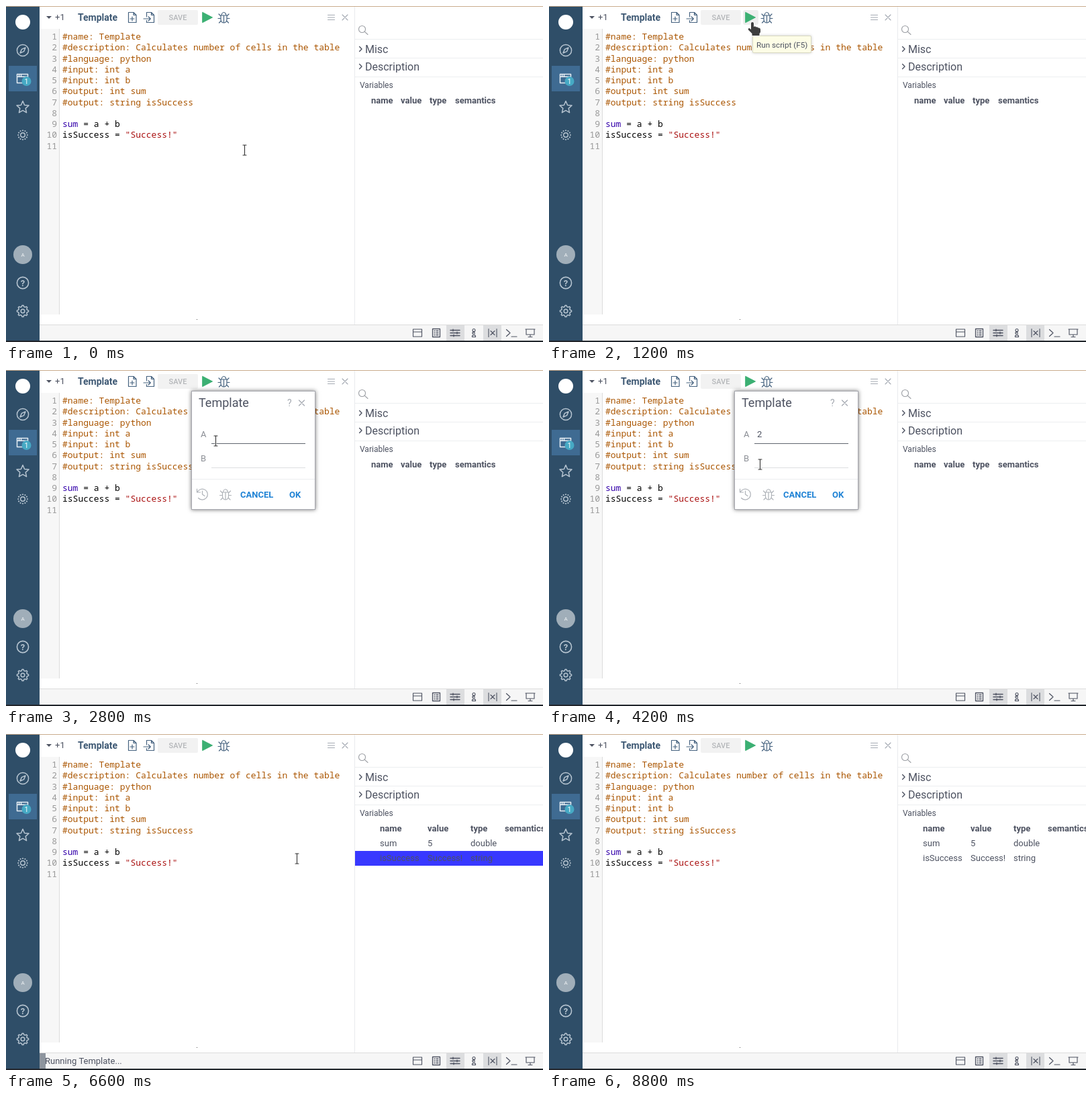
An HTML page with a canvas that plays this animation: 800 by 500 pixels, repeating every 9800 ms.

```html
<!DOCTYPE html>
<html lang="en">
<head>
<meta charset="utf-8">
<title>Script editor</title>
<style>
html, body { margin: 0; width: 100%; height: 100%; overflow: hidden; background: #fff; }
canvas { display: block; width: 800px; height: 500px; }
</style>
</head>
<body>
<canvas id="stage" width="800" height="500"></canvas>
<script>
const g = document.getElementById('stage').getContext('2d');
const LOOP = 9800, TICK = 200;
const UI = 'Roboto, sans-serif', MONO = '"Noto Sans Mono", monospace';
const INK = '#4d5261', STEEL = '#45627f', PALE = '#b6c4d0', BLUE = '#2083d5';

function rect(x, y, w, h, fill) {
  g.fillStyle = fill;
  g.fillRect(x, y, w, h);
}

function round(x, y, w, h, r, fill) {
  g.beginPath();
  g.roundRect(x, y, w, h, r);
  g.fillStyle = fill;
  g.fill();
}

function disc(x, y, r, fill) {
  g.beginPath();
  g.arc(x, y, r, 0, 7);
  g.fillStyle = fill;
  g.fill();
}

function text(s, x, y, size, fill = INK, weight = 400, family = UI, align = 'left') {
  g.font = `${weight} ${size}px ${family}`;
  g.textAlign = align;
  g.fillStyle = fill;
  g.fillText(s, x, y);
}

// Icon from path data, placed around (x, y)
function icon(d, x, y, color, width = 1.2, fill) {
  const p = new Path2D(d);
  g.save();
  g.translate(x, y);
  g.lineJoin = g.lineCap = 'round';
  if (fill) { g.fillStyle = fill; g.fill(p); }
  if (color) { g.strokeStyle = color; g.lineWidth = width; g.stroke(p); }
  g.restore();
}

const ring = (r, x = 0, y = 0) => `M${x + r} ${y}a${r} ${r} 0 1 1 ${-2 * r} 0a${r} ${r} 0 1 1 ${2 * r} 0z`;
const box = (x, y, w, h) => `M${x} ${y}h${w}v${h}h${-w}z`;

// Closed outline whose radius depends on the point index
function polar(n, radius, turn = -Math.PI / 2) {
  let d = '';
  for (let i = 0; i < n; i++) {
    const a = turn + i * 2 * Math.PI / n, r = radius(i);
    d += `${i ? 'L' : 'M'}${(r * Math.cos(a)).toFixed(2)} ${(r * Math.sin(a)).toFixed(2)}`;
  }
  return d + 'z';
}

const ICON = {
  star: polar(10, i => i % 2 ? 4.4 : 9.5),
  gear: polar(32, i => i % 4 < 2 ? 8.6 : 6.6, -1.67) + ring(2.8),
  compass: ring(8.6) + 'M4 -4L1.6 1.6L-4 4L-1.6 -1.6z',
  close: 'M-4 -4L4 4M4 -4L-4 4',
  menu: 'M-5 -3.5h10M-5 0h10M-5 3.5h10',
  chevron: 'M-1.7 -3.5L1.7 0L-1.7 3.5',
  search: ring(5, -1.5, -1.5) + 'M2.2 2.2L7 6.5',
  bug: 'M-4.5 -3h9v6a4.5 5 0 0 1 -9 0zM-3.3 -3a3.3 4.5 0 0 1 6.6 0M0 -3v11' +
       'M-4.5 -2L-7.5 -5M4.5 -2L7.5 -5M-4.5 1.5h-4M4.5 1.5h4M-4 5L-7 8M4 5L7 8',
  fileAdd: 'M-5.5 -7.5h7.5l4 4v11h-11.5zM2 -7.5v4h4M0 -1v6M-3 2h6',
  fileIn: 'M-3.5 -1v-6.5h7l4 4v11h-11v-3M3.5 -7.5v4h4M-8 2h10M-1 -1.2L2.3 2L-1 5.2',
  history: 'M-7 -4A8 8 0 1 1 -6 5.5M-8 -8v5h5M0 -5v5l3.5 2.5'
};

const CODE = [
  '#name: Template',
  '#description: Calculates number of cells in the table',
  '#language: python',
  '#input: int a',
  '#input: int b',
  '#output: int sum',
  '#output: string isSuccess',
  '',
  [['sum', '#30a'], [' = a + b', '#000']],
  [['isSuccess = ', '#000'], ['"Success!"', '#a11']],
  ''
];

// start time, shape, hot spot
const CURSOR = [
  [0, 'beam', 355, 214], [200, 'beam', 352, 205], [400, 'beam', 341, 162],
  [600, 'beam', 323, 96], [800, 'beam', 309, 48], [1000, 'hand', 304, 25],
  [1200, 'hand', 303, 24], [1600, 'hand', 301, 21], [2600, 'beam', 309, 82],
  [2800, 'beam', 312, 105], [4000, 'beam', 313, 124], [4200, 'beam', 314, 140],
  [4400, 'beam', 314, 144], [5400, 'arrow', 388, 168], [5600, 'hand', 431, 187],
  [6600, 'beam', 433, 185], [6800, 'beam', 460, 188], [7000, 'beam', 508, 193],
  [7200, 'arrow', 556, 198], [7400, 'beam', 592, 203], [7600, 'beam', 608, 203],
  [7800, 'beam', 614, 194], [8000, 'beam', 606, 174], [8200, 'beam', 592, 158],
  [8400, 'beam', 586, 153], [8800, 'none', 0, 0]
];

function sidebar() {
  rect(0, 1, 50, 497, '#2f4e68');
  disc(25, 24, 11, '#fff');
  icon(ICON.compass, 25, 66, PALE, 1.5);
  rect(4, 89, 42, 38, '#3f6b92');
  icon('M-8.5 -6.5h16v13h-16zM-8.5 -2.8h16M-5.5 -6.5v3.5M-2.5 -6.5v3.5', 25, 108, '#e5edf3', 1.5);
  disc(30.5, 112, 7, '#46a9c4');
  text('1', 30.5, 116, 10.5, '#fff', 400, UI, 'center');
  icon(ICON.star, 25, 151, PALE, 1.5);
  icon(ring(3.3), 25, 192, PALE, 1.4);
  for (let i = 0; i < 12; i++) {
    const a = i * Math.PI / 6;
    disc(25 + 6.8 * Math.cos(a), 192 + 6.8 * Math.sin(a), 1.05, PALE);
  }
  disc(25, 370, 14, '#a0aeb9');
  text('A', 25, 373, 8, '#f0f3f5', 400, UI, 'center');
  icon(ring(8.6), 25, 412, PALE, 1.6);
  text('?', 25, 417, 13, PALE, 700, UI, 'center');
  icon(ICON.gear, 25, 454, PALE, 1.5);
}

function toolbar(t) {
  icon('M-4 -2h8l-4 4z', 64, 17, null, 0, INK);
  text('+1', 73, 21, 13);
  text('Template', 107, 22, 14, '#3d5873', 700);
  icon(ICON.fileAdd, 188, 17, STEEL);
  icon(ICON.fileIn, 213, 17, STEEL);
  round(226, 6, 60, 22, 2, '#f2f2f2');
  text('SAVE', 256, 21, 11, '#b4b6b9', 500, UI, 'center');
  if (t >= 1000 && t < 2400) round(289, 6, 23, 22, 3, t < 1800 ? '#eeeeee' : '#e2e2e2');
  icon('M-7 -7.5L7.5 0L-7 7.5z', 300, 17, '#3cb073', 1, '#3cb073');
  icon(ICON.bug, 324.5, 17, STEEL);
  icon(ICON.menu, 484.5, 17, '#a3a9b2', 1.1);
  icon(ICON.close, 505, 17, '#a3a9b2', 1.1);
}

function editor() {
  rect(50, 34, 29, 425, '#f7f7f7');
  rect(79, 34, 1, 425, '#ddd');
  CODE.forEach((row, i) => {
    const y = Math.floor(50.44 + 16.28 * i);
    text(i + 1, 76, y, 13, '#999', 400, MONO, 'right');
    let x = 84;
    for (const [s, color] of Array.isArray(row) ? row : [[row, '#a50']]) {
      text(s, x, y, 13, color, 400, MONO);
      x += g.measureText(s).width;
    }
  });
  rect(284, 466, 1, 1, '#555');
}

function panel(t) {
  rect(519, 1, 1, 473, '#e8eaed');
  icon(ICON.search, 532, 36, '#9a9da3', 1.1);
  for (const y of [49, 77, 105]) rect(520, y, 280, 1, '#eceef0');
  ['Misc', 'Description'].forEach((s, i) => {
    icon(ICON.chevron, 528.3, 64 + 26 * i, INK, 1.4);
    text(s, 535, 70 + 26 * i, 16);
  });
  text('Variables', 527, 122, 12);
  const done = t >= 6600;
  const cols = done ? [557, 628, 692, 743] : [544, 588, 631, 669];
  const cells = (row, y, weight) => row.forEach((s, i) => text(s, cols[i], y, 13, INK, weight));
  cells(['name', 'value', 'type', 'semantics'], 145, 700);
  if (!done) return;
  const fade = Math.min(1, (t - 6600) / 800), v = 56 + 199 * fade;
  rect(520, 174, 280, 22, `rgb(${v},${v},255)`);
  cells(['sum', '5', 'double'], 167, 400);
  cells(['isSuccess', 'Success!', 'string'], 189, 400);
}

function statusBar(t) {
  rect(50, 474, 750, 1, '#dcdcdc');
  rect(50, 475, 750, 23, '#f6f6f6');
  rect(656, 475, 27, 23, '#dcdddf');
  rect(711, 475, 27, 23, '#dcdddf');
  const at = (d, x, w = 1.1) => icon(d, x, 486.5, INK, w);
  at(box(-6.5, -5.5, 13, 11) + 'M-6.5 -1.5h13', 613);
  at(box(-5.5, -6, 11, 12) + 'M-3 -3h1M0 -3h3M-3 0h1M0 0h3M-3 3h1M0 3h3', 641, 1.3);
  at('M-7 -4h14M-7 0h14M-7 4h14M-3 -5.3v2.6M3 -1.3v2.6M-2 2.7v2.6', 669, 1.4);
  at(ring(2, 0, -4) + 'M-2 -1h3v5h1.5v2h-5v-2h1.5v-3h-1z', 697);
  at('M-6 -6v12M6 -6v12M-3 -3L3 3M3 -3L-3 3', 725);
  at('M-7.5 -5L-2 0L-7.5 5M0 5.5h8', 753, 1.2);
  at('M-7 -5.5h14M-6 -5.5v8h12v-8M0 2.5v3M-3 6h6', 781);
  if (t >= 6200 && t < 7000) {
    if (t >= 6600) rect(50, 475, 9, 23, '#8e959e');
    text('Running Template...', 58, 491, 13);
  }
}

function tooltip() {
  g.save();
  g.shadowColor = 'rgba(0,0,0,.2)';
  g.shadowBlur = 4;
  round(303, 44, 88, 26, 2, '#d9d9c2');
  g.restore();
  round(304, 45, 86, 24, 1, '#fdfde6');
  text('Run script (F5)', 309, 62, 11.7);
}

function field(label, value, y, focus, caret) {
  text(label, 290, y, 13, '#8d9097');
  text(value, 310, y, 13);
  rect(306, y + 9, 140, 1, focus ? '#60666f' : '#dcdee0');
  if (caret) rect(value ? 317 : 310, y - 12, 1, 15, '#333');
}

function dialog(t) {
  g.save();
  g.shadowColor = 'rgba(0,0,0,.55)';
  g.shadowBlur = 6;
  rect(276, 31, 185, 177, '#fff');
  g.restore();
  g.strokeStyle = '#a5a6ad';
  g.lineWidth = 1;
  g.strokeRect(276.5, 31.5, 184, 176);
  text('Template', 287, 55, 18);
  text('?', 419, 54, 14, '#a3a8b0');
  icon(ICON.close, 440.5, 49, '#a3a8b0', 1.2);
  const inB = t >= 4400;
  field('A', t >= 3600 ? '2' : '', 100, !inB, t >= 3200 && t < 4000);
  field('B', t >= 5000 ? '3' : '', 136, inB && t < 6000, t >= 4600 && t < 5400);
  rect(277, 162, 183, 1, '#eceef0');
  icon(ICON.history, 292.5, 185, '#aeb2b8');
  icon(ICON.bug, 327, 185, '#aeb2b8');
  text('CANCEL', 349, 190, 13, BLUE, 700);
  text('OK', 422, 190, 13, BLUE, 700);
}

function cursor(t) {
  const [, kind, x, y] = CURSOR.findLast(k => k[0] <= t);
  if (kind === 'beam') {
    const d = 'M-2.5 -7.5h2l.5 .5l.5 -.5h2M0 -7v14M-2.5 7.5h2l.5 -.5l.5 .5h2';
    icon(d, x + .5, y + .5, '#fff', 2.4);
    icon(d, x + .5, y + .5, '#333', 1.1);
  } else if (kind === 'hand') {
    icon('M-2 2Q-2 0 0 0Q2 0 2 2V7Q4 5.5 5.5 7.5Q7.5 6.5 8.5 8.5Q12 8 12 11.5V15' +
         'L10.5 17V20H-.5V17L-6 11.5Q-7 9 -4.5 9L-2 11z', x, y, '#fff', 1.6, '#3e3e3e');
    icon('M-2 2Q-2 0 0 0Q2 0 2 2V7Q4 5.5 5.5 7.5Q7.5 6.5 8.5 8.5Q12 8 12 11.5V15' +
         'L10.5 17V20H-.5V17L-6 11.5Q-7 9 -4.5 9L-2 11z', x, y, null, 0, '#3e3e3e');
  } else if (kind === 'arrow') {
    icon('M0 0V16L4 12.5L6.5 18L9 17L6.7 11.5H12z', x, y, '#fff', 1.2, '#3e3e3e');
  }
}

function draw(t) {
  rect(0, 0, 800, 500, '#fff');
  rect(0, 0, 800, 1, '#c9ab8c');
  sidebar();
  toolbar(t);
  editor();
  panel(t);
  statusBar(t);
  rect(0, 498, 800, 2, '#22262c');
  if (t >= 1200 && t < 2200) tooltip();
  if (t >= 2400 && t < 6600) dialog(t);
  cursor(t);
}

const start = performance.now();
function frame() {
  const t = (performance.now() - start) % LOOP;
  draw(Math.floor(t / TICK) * TICK);
  requestAnimationFrame(frame);
}
frame();
</script>
</body>
</html>
```
